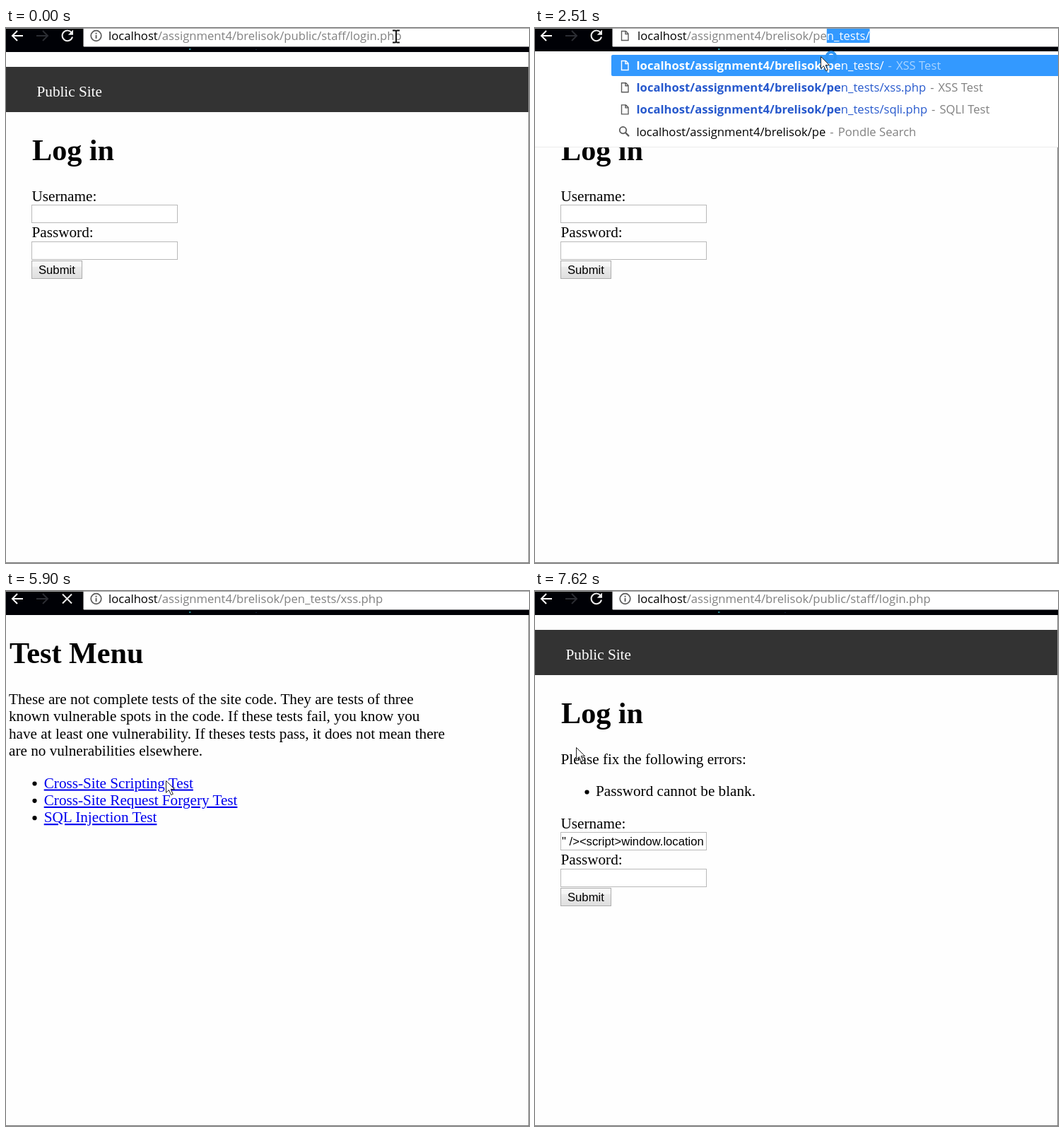
Write an HTML page that moves like this. It is 740 px wide and 757 px high and loops after 8000 ms.

```html
<!DOCTYPE html>
<html lang="en">
<head>
<meta charset="utf-8">
<title>Test run</title>
<style>
  html, body { margin: 0; width: 100%; height: 100%; overflow: hidden; background: #fefefe; }
  svg { display: block; }
  text { font: 21.2px "Liberation Serif", "Times New Roman", serif; fill: #000; white-space: pre; }
  .h1 { font-size: 42.2px; font-weight: bold; }
  .link { fill: #00e; text-decoration: underline; }
  .nav { fill: #fff; }
  .ui { font: 16.67px "Liberation Sans", Arial, sans-serif; }
  .bar { font: 16.65px "Open Sans", "Noto Sans", sans-serif; }
  .bar .path, .row .note { fill: #808080; }
  .bar .sel { fill: #fff; }
  .row .match { font-weight: bold; }
  .row .address { fill: #2759cd; }
  .row.active .address { fill: #fff; }
  .row.active .note { fill: #a9d4ff; }
</style>
</head>
<body>
<svg id="stage" width="740" height="757" viewBox="0 0 740 757"></svg>
<script>
const LOOP = 8000, BLUE = '#39f';
const HOST = 'localhost';
const BASE = HOST + '/assignment4/brelisok/';
const LOGIN = BASE + 'public/staff/login.php';
const TESTS = BASE + 'pen_tests/';

const stage = document.getElementById('stage');
const ruler = document.createElement('canvas').getContext('2d');
ruler.font = '16.65px "Open Sans", "Noto Sans", sans-serif';
const widthOf = s => ruler.measureText(s).width;

// Hard changes: each entry overrides part of the state from its time on.
const changes = [
  [0, { url: LOGIN, icon: 'info', nav: 'reload', page: 'login', rows: 0 }],
  [2360, { url: TESTS, icon: 'file' }],
  [2510, { rows: 4 }],
  [3380, { rows: 5 }],
  [3680, { rows: 0, icon: 'info', page: 'menu' }],
  [5760, { nav: 'stop' }],
  [5900, { url: TESTS + 'xss.php' }],
  [6040, { nav: 'reload', page: 'xss' }],
  [7470, { nav: 'stop', url: LOGIN }],
  [7620, { nav: 'reload', page: 'errors' }]
];

// Progress from 0 to 1 in n jumps, the first at t0 and the last at t1.
const glide = (t, t0, t1, n) => t < t0 ? 0
  : Math.min(1, (Math.floor((t - t0) / (t1 - t0) * (n - 1) + 1e-6) + 1) / n);

const escape = s => s.replace(/&/g, '&amp;').replace(/</g, '&lt;');
const text = (x, y, s, cls = '') => `<text x="${x}" y="${y}" class="${cls}">${escape(s)}</text>`;
const span = (s, cls, dx = 0) => `<tspan class="${cls}" dx="${dx}">${escape(s)}</tspan>`;
const rect = (x, y, w, h, fill, more = '') =>
  `<rect x="${x}" y="${y}" width="${w}" height="${h}" fill="${fill}" ${more}/>`;
const line = (d, color, w = 2) => `<path d="${d}" fill="none" stroke="${color}" stroke-width="${w}"/>`;
const bullet = (x, y) => `<circle cx="${x}" cy="${y}" r="3.1"/>`;
const at = (x, y, s) => `<g transform="translate(${x} ${y})">${s}</g>`;

const field = y => rect(36.5, y + .5, 206, 25, '#fff', 'stroke="#b9b9b9"');
const button = (x, y, w, label, look = 'face') =>
  rect(x + .5, y + .5, w, 25, `url(#${look})`, `stroke="${look === 'face' ? '#adadad' : '#888'}"`) +
  text(x + 10, y + 18.5, label, 'ui');

const icons = {
  info: () => `<circle cx="127.5" cy="11" r="7.3" fill="none" stroke="#5c5c5c" stroke-width="1.7"/>` +
    rect(126.6, 10, 1.9, 5, '#5c5c5c') + rect(126.6, 6.7, 1.9, 2, '#5c5c5c'),
  file: (color = '#5c5c5c') => line('M122.5 4.5H128.5L132 8V17.5H122.5ZM128 4.5V8.5H132', color, 1.4),
  search: () => `<circle cx="124.5" cy="9" r="4.7" fill="none" stroke="#5c5c5c" stroke-width="1.8"/>` +
    line('M128 12.5L133 17.5', '#5c5c5c', 2.2),
  reload: () => line('M93.2 7.2A7.3 7.3 0 1 0 94 12.5', '#eee') + '<path d="M95 2.5V9.8H87.8Z" fill="#eee"/>',
  stop: () => line('M80 4.5L93 17.5M93 4.5L80 17.5', '#eee')
};

const cursors = {
  arrow: '<path d="M.5 .5V17.4L4.5 13.6L7.6 20.6L10.3 19.4L7.2 12.6H12.6Z" fill="#fff" stroke="#222"/>',
  beam: line('M-5 -8.5H-1.2L0 -7.5L1.2 -8.5H5M0 -8V8M-5 8.5H-1.2L0 7.5L1.2 8.5H5', '#111', 1.9),
  hand: '<path d="M-2 2Q0 -1 2 2V9Q4 7 6 10Q8 8 10 11Q13 10 13 13V18L11 24H-1L-8 15Q-8 11 -5 13L-2 16Z" ' +
    'fill="#fff" stroke="#111" stroke-width="1.2"/>'
};

const form = (name = '') => text(36.5, 244.5, 'Username:') + field(250) + text(38, 269, name, 'ui') +
  text(36.5, 296, 'Password:') + field(302) + button(36, 329, 71, 'Submit');

const loginHead = rect(0, 55, 740, 64, '#333') + text(43.5, 96.5, 'Public Site', 'nav') +
  text(37, 186.5, 'Log in', 'h1');

const intro = [
  'These are not complete tests of the site code. They are tests of three',
  'known vulnerable spots in the code. If these tests fail, you know you',
  'have at least one vulnerability. If theses tests pass, it does not mean there',
  'are no vulnerabilities elsewhere.'
];
const tests = ['Cross-Site Scripting Test', 'Cross-Site Request Forgery Test', 'SQL Injection Test'];

const pages = {
  login: () => loginHead + form(),
  errors: () => loginHead + text(36.5, 244.5, 'Please fix the following errors:') +
    bullet(73.5, 284.5) + text(86, 290, 'Password cannot be blank.') +
    at(0, 91, form('" /><script>window.location')),
  menu: () => text(5, 101.5, 'Test Menu', 'h1') +
    intro.map((s, i) => text(4, 160 + 24.35 * i, s)).join('') +
    tests.map((s, i) => bullet(40.5, 272.5 + 24.35 * i) +
      text(53.7, 278.5 + 24.35 * i, s, 'link')).join(''),
  xss: t => text(4, 64, 'Test Menu', 'link') +
    text(4, 134, 'Click here to test your site for XSS vulnerability.') +
    text(4, 180, 'If successful it will return cookie data.') +
    button(4, 206, 87, 'Test XSS', t >= 7320 ? 'down' : t >= 7020 ? 'over' : 'face')
};

const suggestions = [
  ['', 'XSS Test'],
  ['xss.php', 'XSS Test'],
  ['sqli.php', 'SQLI Test'],
  [null, 'Pondle Search'],
  ['csrf.php?tested=1', 'CSRF Test']
];

function dropdown(count) {
  if (!count) return '';
  const typed = count < 5 ? BASE + 'pe' : TESTS;
  const bottom = count < 5 ? 168 : 200;
  const rows = suggestions.slice(0, count).map(([tail, note], i) => {
    const y = 42 + 31.2 * i;
    const address = tail === null ? span(typed, '')
      : span(typed, 'match address') + span((TESTS + tail).slice(typed.length), 'address');
    const icon = tail === null ? icons.search() : icons.file(i ? undefined : '#fff');
    return at(0, y, icon + `<text x="143.5" y="17" class="bar row${i ? '' : ' active'}">` +
      address + span('-', 'note', 6) + span(note, 'note', 6) + '</text>');
  });
  return rect(0, 33, 740, bottom - 33, '#fff') + rect(0, bottom, 740, 1, '#ececec') +
    rect(108, 38, 640, 30, BLUE, 'rx="2"') + rows.join('');
}

function pointer(t) {
  if (t < 960) {
    const p = glide(t, 130, 540, 4);
    return { kind: 'beam', x: 552 + 60 * p, y: 12 + 4 * p };
  }
  if (t < 2060) {
    const p = glide(t, 960, 1660, 6);
    return { kind: 'beam', x: 612 - 208 * p, y: 16 + 25 * p };
  }
  if (t < 4670) return { kind: 'arrow', x: 404, y: 40, busy: t >= 2360 };
  if (t < 6320) {
    const p = glide(t, 4805, 5480, 6), y = 142 + 126 * p;
    const kind = t >= 5900 ? 'arrow' : y < 236 ? 'beam' : y < 255 ? 'arrow' : 'hand';
    return { kind, x: 284 - 58 * p, y };
  }
  const rest = 1 - glide(t, 6320, 7020, 6);
  return { kind: 'arrow', x: 58 + 168 * rest ** 1.31, y: 221 + 47 * rest ** 2.23 };
}

// Index of the first selected character in the address.
function selectionStart(t, url, x) {
  if (t >= 2360 && t < 3380) return BASE.length + 2;
  if (t < 960 || t >= 2360) return url.length;
  let i = url.length;
  while (i > 0 && 145 + widthOf(url.slice(0, i - 1)) >= x - 4) i--;
  return i;
}

function toolbar(t, { url, icon, nav }, x) {
  const start = selectionStart(t, url, x);
  const left = 145 + widthOf(url.slice(0, start)), right = 145 + widthOf(url);
  return rect(0, 0, 740, 34, '#000106') + rect(109.5, 0, 631, 26.5, '#fff', 'rx="1"') +
    rect(0, 0, 740, 1, '#a0a0a0') + rect(259, 29, 2.5, 2, '#26818c') + rect(353, 30, 2, 1, '#14243c') +
    line('M24 11H9M16 4L9 11L16 18', '#fff') + line('M43 11H59M52 4L59 11L52 18', '#2b2d33') +
    icons[nav]() + icons[icon]() +
    (start < url.length ? rect(left, 1, right - left, 20, BLUE) : '') +
    '<text x="145" y="16.7" class="bar">' + span(HOST, '') +
    span(url.slice(HOST.length, start), 'path') + span(url.slice(start), 'sel') + '</text>' +
    (t >= 3380 && t < 3680 ? rect(right, 2, 1.5, 18, '#000') : '');
}

const gradient = (id, top, mid, low) => `<linearGradient id="${id}" x2="0" y2="1">
  <stop stop-color="${top}"/><stop offset=".3" stop-color="${top}"/>
  <stop offset=".36" stop-color="${mid}"/><stop offset="1" stop-color="${low}"/></linearGradient>`;
const defs = '<defs>' + gradient('face', '#f6f6f6', '#ebebeb', '#dedede') +
  gradient('over', '#fbfbfb', '#f2f2f2', '#e6e6e6') + gradient('down', '#e2e2e2', '#e6e6e6', '#f0f0f0') + '</defs>';

let shown = '';
function frame(now) {
  const t = now % LOOP;
  const state = Object.assign({}, ...changes.filter(c => c[0] <= t).map(c => c[1]));
  const { kind, x, y, busy } = pointer(t);
  const picture = defs + rect(0, 0, 740, 757, '#fefefe') + pages[state.page](t) +
    rect(739, 34, 1, 723, '#8c8c8c') + rect(0, 756, 740, 1, '#777') +
    toolbar(t, state, x) + dropdown(state.rows) +
    (busy ? `<circle cx="419" cy="40.5" r="6.3" fill="none" stroke="#2f95f3" stroke-width="4"/>` : '') +
    at(x, y, cursors[kind]);
  if (picture !== shown) stage.innerHTML = shown = picture;
  requestAnimationFrame(frame);
}
requestAnimationFrame(frame);
</script>
</body>
</html>
```
